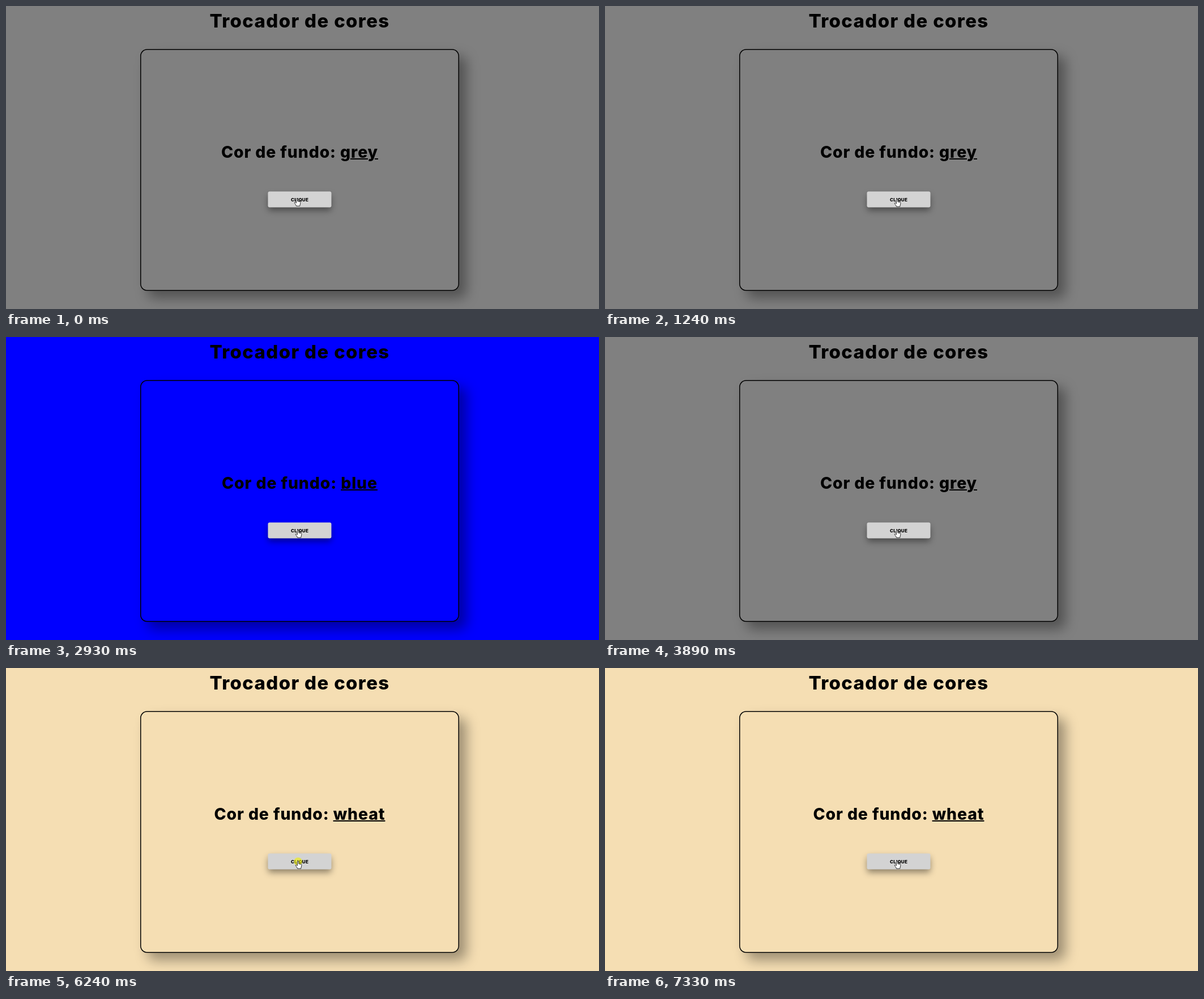
An HTML page that plays this animation: 1047 by 535 pixels, repeating every 7.46 s.

```html
<!DOCTYPE html>
<html lang="pt-BR">
<head>
<meta charset="utf-8">
<title>Trocador de cores</title>
<style>
html, body { margin: 0; width: 100%; height: 100%; overflow: hidden; }
body { position: relative; color: #000; font: 800 33px Inter, sans-serif; }
body > * { position: absolute; }
h1, h2 { left: 0; width: 1037px; margin: 0; font: inherit; text-align: center; white-space: nowrap; line-height: 40px; }
h1 { top: 6px; letter-spacing: .04em; }
h2 { top: 238px; font-size: 28.4px; letter-spacing: .031em; }
#name { text-decoration: underline 2px; text-underline-offset: 1px; }
#card {
  left: 237px; top: 76px; width: 563px; height: 427px; border-radius: 12px;
  box-shadow: 13px 13px 22px rgba(0, 0, 0, .36);
}
#button {
  left: 463px; top: 328px; width: 111px; height: 27px; border-radius: 3px;
  box-shadow: 0 6px 12px rgba(0, 0, 0, .42);
}
svg { left: 0; top: 0; width: 1047px; height: 535px; }
svg text { font-size: 8.1px; letter-spacing: .02em; text-anchor: middle; }
</style>
</head>
<body>
<div id="card"></div>
<div id="button"></div>
<h1>Trocador de cores</h1>
<h2>Cor de fundo: <span id="name">grey</span></h2>
<svg>
  <rect x="237.75" y="76.75" width="561.5" height="425.5" rx="11.5" fill="none" stroke="#000" stroke-width="1.5"/>
  <rect x="462.5" y="327.5" width="112" height="28" rx="3" fill="lightgray"/>
  <text x="518.5" y="345">CLIQUE</text>
  <g id="pointer">
    <circle id="halo" r="7.2" cy="1" fill="#f2f200" fill-opacity=".6"/>
    <path fill="#fff" stroke="#111" stroke-width=".9" stroke-linejoin="round"
      d="M-1.3 8.4V1.2a1.2 1.2 0 0 1 2.4 0V5l4 .9q1.2 .4 1.1 1.7c-.1 2-.9 3.4-1.2 5.9H-1.1C-1.6 11-4.6 8.7-4.4 7.5c.2-1 1.6-.9 3.1 .9z"/>
  </g>
</svg>
<script>
const LOOP = 7460;
// press time, release time, colour shown on release
const clicks = [
  [20, 240, 'wheat'], [1050, 1200, 'grey'], [1810, 2010, 'red'],
  [2740, 2930, 'blue'], [3710, 3890, 'grey'], [4570, 4700, 'blue'],
  [5400, 5580, 'wheat'], [6240, 6460, 'grey'], [7090, 7330, 'wheat']
];
const get = id => document.getElementById(id);
const label = get('name'), halo = get('halo'), pointer = get('pointer');

function draw(t) {
  const done = clicks.filter(([, release]) => t >= release);
  const color = done.length ? done[done.length - 1][2] : 'grey';
  const pressed = clicks.some(([press, release]) => t >= press && t < release);
  const shift = t < 1220 ? 0 : t < 1240 ? .5 : 1;
  document.body.style.background = color;
  if (label.textContent !== color) label.textContent = color;
  halo.style.display = pressed ? '' : 'none';
  pointer.setAttribute('transform', `translate(${513.7 + 2 * shift} ${339.7 + shift})`);
}

const start = performance.now();
function tick() {
  draw((performance.now() - start) % LOOP);
  requestAnimationFrame(tick);
}
tick();
</script>
</body>
</html>
```
